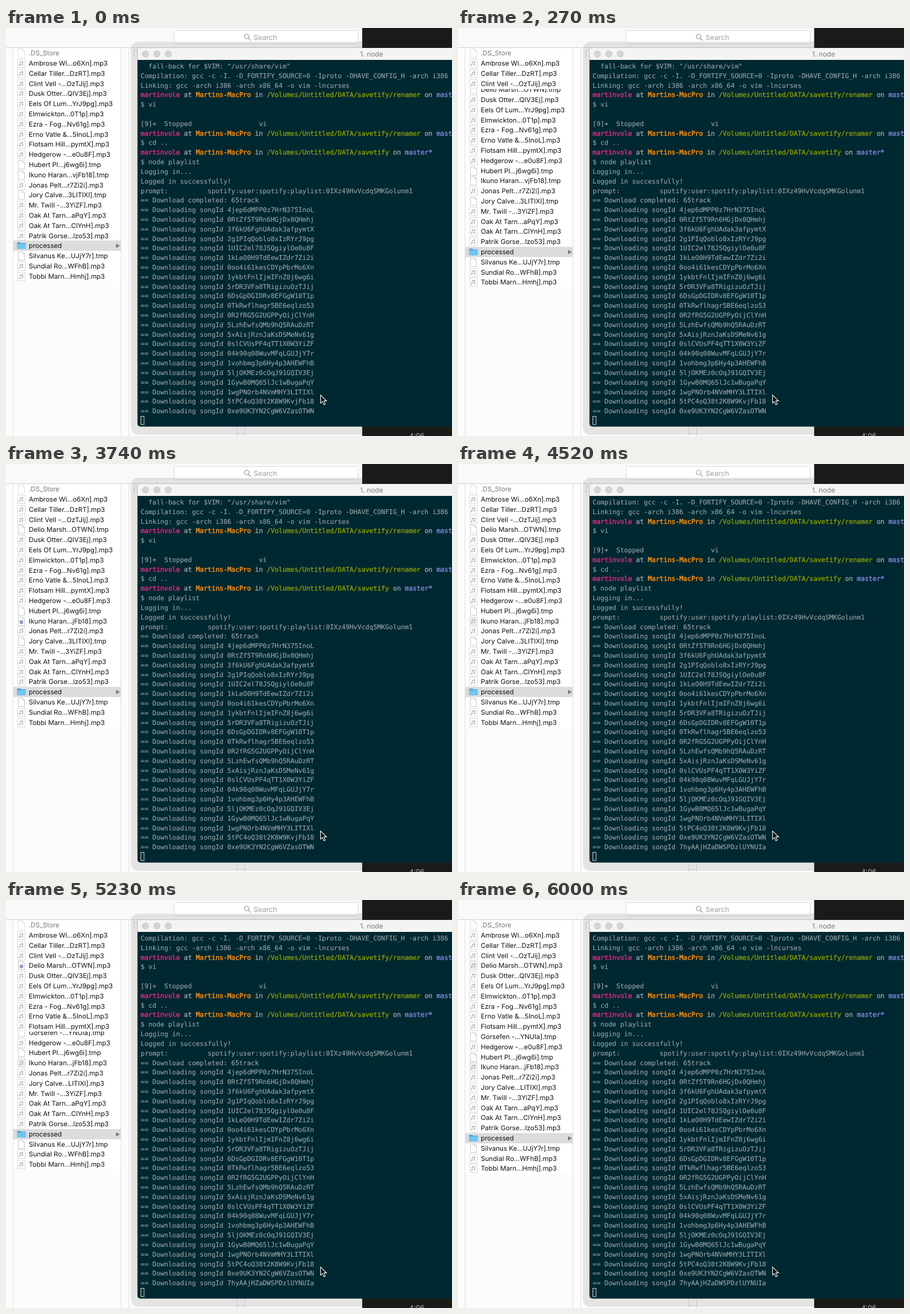
An HTML page that plays this animation: 782 px wide and 716 px high, repeating every 8 s.

```html
<!DOCTYPE html>
<html lang="en">
<head>
<meta charset="utf-8">
<title>Playlist download</title>
<style>
  html, body { margin: 0; width: 100%; height: 100%; overflow: hidden; background: #fcfcfc; }
  svg { display: block; text-rendering: geometricPrecision; }
  text { white-space: pre; }
  .ui { font-family: Inter, "Open Sans", sans-serif; }
  .term { font: 11.49px "DejaVu Sans Mono", "Noto Sans Mono", monospace; }
  .term tspan { --ink: #98a5a6; fill: var(--ink); stroke: var(--ink); stroke-width: .12; }
  .term .word { stroke-width: .35; }
  .term .user { --ink: #d9267f; stroke-width: .55; }
  .term .host { --ink: #f08a12; stroke-width: .55; }
  .term .path { --ink: #8a9e00; stroke-width: .35; }
  .term .branch { --ink: #7f84d6; stroke-width: .45; }
</style>
</head>
<body>
<svg id="stage" width="782" height="716" viewBox="0 0 782 716">
  <defs>
    <g id="page">
      <path d="M2.5 1.5h7.5l3.5 3.5v11.5h-11z" fill="#fff" stroke="#c6c6c6"/>
      <path d="M10 1.5v3.5h3.5" fill="none" stroke="#c6c6c6"/>
    </g>
    <g id="note">
      <path d="M5.8 12V6.3l4.7-1v5.6M5.8 7.7l4.7-1" fill="none" stroke="#adadad" stroke-width=".9"/>
      <g fill="#adadad"><circle cx="4.9" cy="12" r="1.3"/><circle cx="9.6" cy="11" r="1.3"/></g>
    </g>
    <g id="music">
      <rect x="1.5" y="1.5" width="13" height="15" fill="#fdfdfd" stroke="#d9d9d9"/>
      <use href="#note"/>
    </g>
    <g id="fresh">
      <rect x="1.5" y="1.5" width="13" height="15" fill="#efefef" stroke="#dcdcdc"/>
      <use href="#note"/>
    </g>
    <g id="badge">
      <use href="#page"/><circle cx="8" cy="10.5" r="3.4" fill="#93a5c4"/>
    </g>
    <g id="folder">
      <path d="M.5 4q0-1 1-1h4.5l1.5 1.5h7q1 0 1 1V14q0 1-1 1h-13q-1 0-1-1z" fill="#48a9dc"/>
      <path d="M.5 6h15v8q0 1-1 1h-13q-1 0-1-1z" fill="#6fc7f0"/>
    </g>
  </defs>

  <rect width="782" height="716" fill="#fcfcfc"/>
  <g stroke="#dedede">
    <path d="M12.5 35V716M201.5 35V716M215.5 35V716"/>
    <path d="M404.5 699V716M418.5 699V716M405 711.5h13"/>
  </g>
  <g id="files" class="ui" font-size="11.65"></g>

  <rect width="782" height="34" fill="#f9f9f9"/>
  <path d="M0 34.5H782" stroke="#cfcfcf"/>
  <rect x="294.5" y="4.5" width="323" height="23" rx="3" fill="#fff" stroke="#d9d9d9"/>
  <g fill="none" stroke="#929292" stroke-width="1.2">
    <circle cx="422" cy="15" r="4"/><path d="M425 18l4 4.2"/>
  </g>
  <text class="ui" x="434" y="20.5" font-size="12.5" fill="#a0a0a0">Search</text>
  <path d="M224.5 51V38.5h7" fill="none" stroke="#ccc"/>

  <rect x="219" y="24" width="600" height="690" rx="13" opacity=".095"/>
  <path d="M624.5 0H782V716H624.5z" fill="#1a1a1a"/>
  <text class="ui" x="707" y="720" font-size="12.2" fill="#b5b5b5">4:06</text>

  <rect x="230.5" y="35" width="570" height="664.5" rx="5" fill="#002831"/>
  <path d="M230.5 56V40q0-5 5-5H782v21z" fill="#f4f4f4"/>
  <g fill="#d4d4d4" stroke="#c4c4c4">
    <circle cx="244.5" cy="45.5" r="5.5"/><circle cx="264.5" cy="45.5" r="5.5"/><circle cx="284.5" cy="45.5" r="5.5"/>
  </g>
  <text class="ui" x="641" y="50" font-size="12" fill="#7c7c7c" text-anchor="middle">1. node</text>
  <g id="term" class="term"></g>
  <rect x="236.5" y="681.5" width="5.5" height="14.5" fill="none" stroke="#d5dcdc"/>
  <path d="M551.5 644v14.3l3.3-3 2.5 5.7 2.5-1.1-2.4-5.5h4.6z" fill="#101010" stroke="#fff" stroke-width="1.1"/>
</svg>
<script>
const LOOP = 8000, ROW = 17.8, LIST_TOP = 35.1, LINE = 16.81;
const NS = "http://www.w3.org/2000/svg";

function add(parent, tag, attrs = {}, content = "") {
  const el = document.createElementNS(NS, tag);
  for (const key in attrs) el.setAttribute(key, attrs[key]);
  el.textContent = content;
  return parent.appendChild(el);
}

const names = `.DS_Store
Ambrose Wi...o6Xn].mp3
Cellar Tiller...DzRT].mp3
Clint Vell -...OzTJij].mp3
Delio Marsh...OTWN].tmp
Dusk Otter...QIV3Ej].mp3
Eels Of Lum...YrJ9pg].mp3
Elmwickton...0T1p].mp3
Ezra - Fog...Nv61g].mp3
Erno Vatle &...5InoL].mp3
Flotsam Hill...pymtX].mp3
Gorsefen -...YNUIa].tmp
Hedgerow -...e0u8F].mp3
Hubert Pl...j6wg6i].tmp
Ikuno Haran...vjFb18].tmp
Jonas Pelt...r7Zi2i].mp3
Jory Calve...3LITIXl].tmp
Mr. Twill -...3YiZF].mp3
Oak At Tarn...aPqY].mp3
Oak At Tarn...ClYnH].mp3
Patrik Gorse...lzo53].mp3
processed
Silvanus Ke...UJjY7r].tmp
Sundial Ro...WFhB].mp3
Tobbi Marn...Hmhj].mp3`.split("\n");

// Timed changes, keyed by row index.
const DELIO = 4, GORSE = 11, IKUNO = 14, JORY = 16;
const inserts = [
  { row: DELIO, steps: [120, 210, 270, 320, 380] },
  { row: GORSE, steps: [5120, 5180, 5230, 5290, 5340] }
];
const iconChanges = {
  [DELIO]: [[4940, "badge"], [6000, "fresh"]],
  [IKUNO]: [[3740, "badge"], [4100, "fresh"]],
  [JORY]: [[4940, "music"]]
};
const labelChanges = {
  [DELIO]: [[5120, "Delio Marsh...OTWN].mp3"]],
  [IKUNO]: [[3740, "Ikuno Haran...jFb18].mp3"]],
  [JORY]: [[5120, "Jory Calve...LITIXl].mp3"]]
};

const files = document.getElementById("files");
const rows = names.map((name, i) => {
  const g = add(files, "g"), isFolder = name === "processed", isHidden = i === 0;
  add(g, "rect", { x: 13, width: 188, height: 18, fill: isFolder ? "#dcdcdc" : "#fff" });
  const base = isFolder ? "folder" : name.endsWith("mp3") ? "music" : "page";
  const icon = add(g, "use", { x: 19, opacity: isHidden ? 0.55 : 1 });
  const label = add(g, "text", { x: 40, y: 13, fill: isHidden ? "#777" : "#111" });
  if (isFolder) add(g, "path", { d: "M193 5.5l6.5 3.7-6.5 3.7z", fill: "#777" });
  return { g, icon, label, base, name };
});
// New rows slide out from behind the opaque row above.
inserts.forEach(({ row }) => files.prepend(rows[row].g));

const ids = `4jep6dMPP0z7HrN375InoL 0RtZf5T9Rn6HGjDx0QHmhj 3f6kU6FghUAdak3afpymtX
2g1PIqQoblo8xIzRYrJ9pg 1UIC2el78JSQgiylOe0u8F 1kLeO0H9TdEewIZdr7Zi2i
0oo4i61kesCDYpPbrMo6Xn 1ykbtFnlIjmIFnZ8j6wg6i 5rDR3VFa8TRigizuOzTJij
6DsGpDGIDRv8EFGgW10T1p 0TkRwflhagr5BE6eqlzo53 0R2fRG5G2UGPPyOijClYnH
5LzhEwfsQMb9hQ5RAuDzRT 5xAisjRznJaKsDSMeNv61g 0slCVUsPF4qTT1X0W3YiZF
04k90q08WuvMFqLGUJjY7r 1vohbmg3p6Hy4p3AHEWFhB 5ljOKMEz0cOqJ91GQIV3Ej
1GywB0MQ65lJc1wBugaPqY 1wgPNOrb4NVmMHY3LITIXl 5tPC4oQ38t2K8W9KvjFb18
0xe9UK3YN2CgW6VZasOTWN 7hyAAjHZaDWSPDzlUYNUIa`.split(/\s+/);

const shell = dir => [
  ["user", "martinvole"], ["word", " at "], ["host", "Martins-MacPro"], ["word", " in "],
  ["path", "/Volumes/Untitled/DATA/savetify" + dir], ["word", " on "], ["branch", "master*"]
];
const output = [
  '  fall-back for $VIM: "/usr/share/vim"',
  "Compilation: gcc -c -I. -D_FORTIFY_SOURCE=0 -Iproto -DHAVE_CONFIG_H -arch i386",
  "Linking: gcc -arch i386 -arch x86_64 -o vim -lncurses",
  shell("/renamer"), "$ vi", "",
  "[9]+  Stopped" + " ".repeat(17) + "vi",
  shell("/renamer"), "$ cd ..",
  shell(""), "$ node playlist",
  "Logging in...", "Logged in successfully!",
  "prompt:" + " ".repeat(10) + "spotify:user:spotify:playlist:0IXz49HvVcdqSMKGolunm1",
  "== Download completed: 65track",
  ...ids.map(id => "== Downloading songId " + id)
];
const term = document.getElementById("term");
const lines = output.map(line => {
  const text = add(term, "text", { x: 236 });
  const parts = typeof line === "string" ? [["plain", line]] : line;
  parts.forEach(([cls, str]) => add(text, "tspan", { class: cls }, str));
  return text;
});

const latest = (changes = [], start, t) =>
  changes.reduce((value, [at, next]) => t >= at ? next : value, start);

function draw(t) {
  const open = inserts.map(({ row, steps }) =>
    ({ row, part: steps.filter(at => t >= at).length / steps.length }));
  rows.forEach((r, i) => {
    let pos = i;
    for (const { row, part } of open) if (i >= row) pos += part - 1;
    r.g.setAttribute("transform", `translate(0 ${Math.round(LIST_TOP + pos * ROW)})`);
    r.icon.setAttribute("href", "#" + latest(iconChanges[i], r.base, t));
    r.label.textContent = latest(labelChanges[i], r.name, t);
  });

  const scrolled = t >= 4520 ? 1 : 0;
  lines.forEach((line, i) => {
    const row = i - scrolled;
    line.setAttribute("y", Math.round(71 + row * LINE));
    line.setAttribute("visibility", row >= 0 && row <= 36 ? "visible" : "hidden");
  });
}

const start = performance.now();
function tick() {
  draw((performance.now() - start) % LOOP);
  requestAnimationFrame(tick);
}
tick();
</script>
</body>
</html>
```
